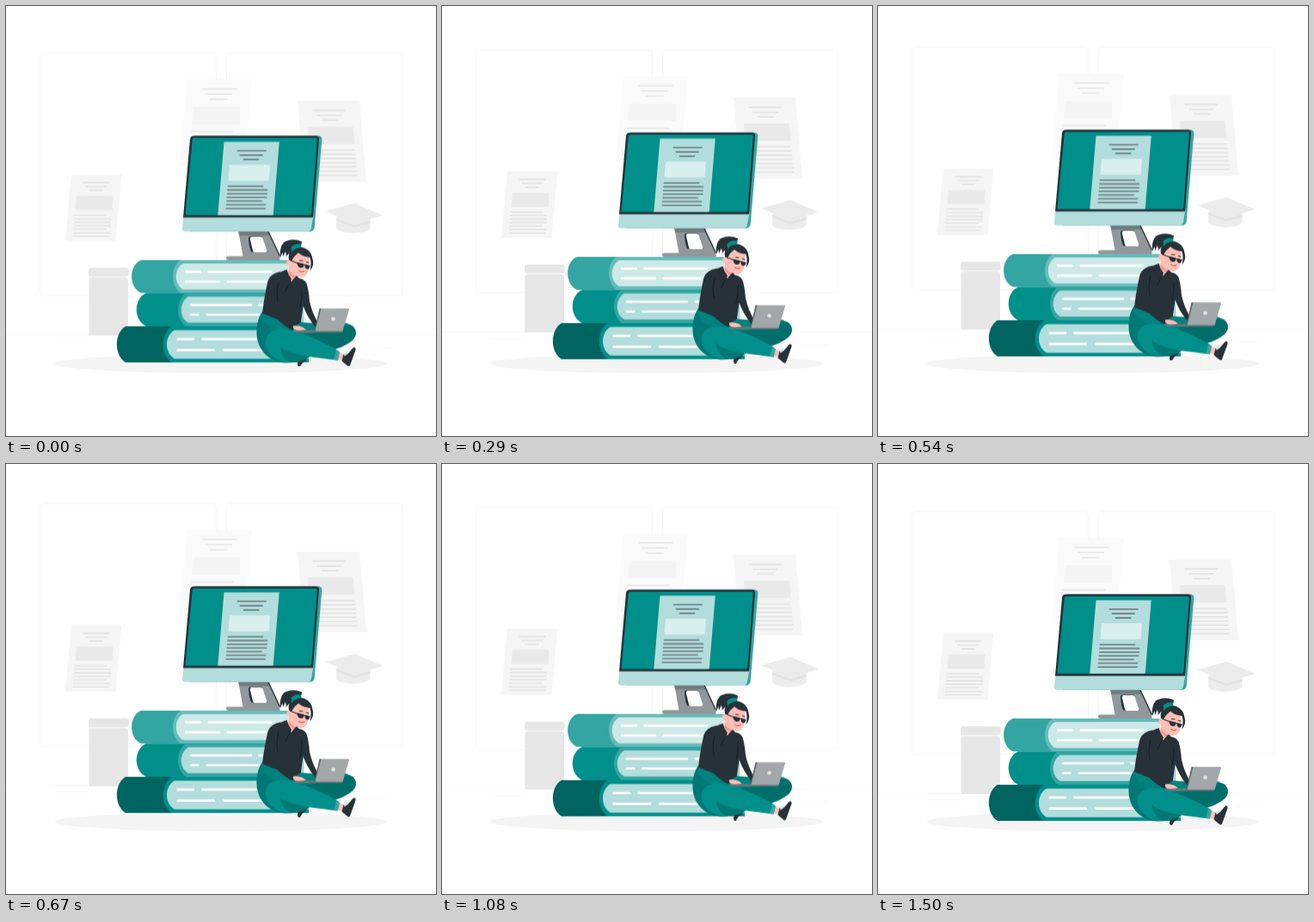
These frames come from a looping animation (500x500 px, 1.54 s). An HTML page:

```html
<!DOCTYPE html>
<html lang="en">
<head>
<meta charset="utf-8">
<title>Reading online</title>
<style>
html, body { margin: 0; width: 100%; height: 100%; overflow: hidden; background: #fff; }
svg { display: block; width: 100vw; height: 100vh; }
.float { animation: float 1540ms linear -45ms infinite; }
@keyframes float { 50% { transform: translateY(-10px); } }
.line { fill: none; stroke-linecap: round; }
.teal { fill: #008f8b; }
.light { fill: #33a5a2; }
.deep { fill: #006461; }
.pale { fill: #b2dddc; }
.ink { fill: #263238; }
.skin { fill: #fdbfb6; }
</style>
</head>
<body>
<svg viewBox="0 0 500 500">
  <ellipse cx="249.5" cy="416" rx="193.5" ry="11" fill="#f4f4f4"/>
  <g class="float">
    <!-- wall and floor -->
    <g fill="none" stroke="#f6f6f6">
      <rect x="39.5" y="55.3" width="205" height="282.2" rx="4"/>
      <rect x="256.5" y="55.3" width="204" height="282.2" rx="4"/>
      <path d="M0 383H500M56 391h40M415 398.5h33" stroke-width=".8"/>
    </g>

    <!-- papers -->
    <path d="M76 196.8H134.5L127.5 274H69Z" fill="#f5f5f5"/>
    <path d="M82 221.5H124.5L123.5 237.8H80.5Z" fill="#e9e9e9"/>
    <path class="line" stroke="#e0e0e0" stroke-width="1.3" d="M90 206h30M93 210.5h24M97 215h15.500M80 243.800h37M79.700 247.900h42M79.400 252h42M79 256.100h42.500M78.700 260.200h38M78.400 264.300h42M78 268.300h41.500"/>
    <path d="M211 86H286L277 186H202Z" fill="#fafafa"/>
    <path d="M218 118H272.500L271.500 138H216Z" fill="#f4f4f4"/>
    <path class="line" stroke="#e4e4e4" stroke-width="1.6" d="M229 97h39M232.500 103h30M237 109h20M216 146.500h48"/>
    <path d="M339 111H411L419 205H347Z" fill="#f5f5f5"/>
    <path d="M351 141H403.500L405.500 161H352Z" fill="#e9e9e9"/>
    <path class="line" stroke="#e0e0e0" stroke-width="1.5" d="M357 122h37M362 127.700h28M367 133.300h18.500M355 168h50M355 172.900h51M356 177.800h50.500M356 182.700h51M357 187.600h50M357 192.500h51M357 197.400h51"/>

    <!-- cap -->
    <path d="M384 246V259C388 266.500 419 266.500 423.500 259V247Z" fill="#ececec"/>
    <path d="M384 247.500L405 255.500L423.500 250V253L405 258L384 250Z" fill="#e2e2e2"/>
    <path d="M371.500 239.500L405 229.800L438.500 244L405 253.800Z" fill="#ebebeb"/>

    <!-- jar -->
    <g fill="#e6e6e6">
      <rect x="96" y="305" width="46.500" height="10.300" rx="3"/>
      <path d="M96.500 383.700V320Q96.500 316.300 100 316.300H138.500Q142 316.300 142 320V383.700Z"/>
    </g>

    <!-- monitor stand -->
    <path d="M270 261H305L318.500 291V296H258.500Q256 296 256 293.700Q256 291.500 258.500 291.500H275.500Z" fill="#91979a"/>
    <path d="M270 261H305L307 267.500H271Z" fill="#737b7f"/>
    <path d="M304.500 262L318.500 291.500" stroke="#263238" stroke-width="1.300"/>
    <path class="ink" d="M284 268.500H297.500L303.500 286.500H285.500Q283 284 282 271Q282 268.500 284 268.500Z"/>
    <path d="M285.500 269H296Q298 269 298.700 271L303.200 284.500Q303.700 287 301.500 287H289.500Q287.500 287 287 285L283.800 271.500Q283.500 269 285.500 269Z" fill="#fff"/>

    <!-- monitor -->
    <path class="light" d="M220 151.500H363Q367.700 151.500 367.300 156L358.700 258Q358 262.800 353 262.800H215Z"/>
    <path class="pale" d="M206.500 245H357.500L355 258.500Q354.200 262.800 350 262.800H208Q204.800 262.800 205 259.500Z"/>
    <path class="ink" d="M218.500 151.500H360.500Q364.300 151.500 364 155.300L357 246.500H206L214 155.500Q214.500 151.500 218.500 151.500Z"/>
    <path class="teal" d="M219 154H360Q362 154 361.800 156L355.300 241.500Q355 243.700 353 243.700H210.500Q208.400 243.700 208.600 241.500L216.700 156Q217 154 219 154Z"/>
    <path class="pale" d="M253.500 158.500H317.800L310.700 243.700H246.300Z"/>
    <path d="M260 185.300H307L305.800 203.700H258.500Z" fill="#d9efee"/>
    <path class="line" stroke="#74868a" stroke-width="1.800" d="M269.500 168.800h32.500M272.500 174h25.500M276.500 179h17M258.500 210.200h40M258 214.500h45.500M257.700 218.800h45.500M257.300 223.100h45.500M257 227.400h40M256.600 231.700h45M256.300 236.200h45"/>

    <!-- books -->
    <path class="light" d="M157 296H328V334.300H157C142.500 328 142.500 302 157 296Z"/>
    <path d="M203 296H328V334.300H203C191 326 191 304 203 296Z" fill="#66bcb9"/>
    <path d="M206 300H328V330.300H206C195 324 195 306 206 300Z" fill="#cce9e8"/>
    <path class="teal" d="M163 334.300H345.500V373H163C148 366 148 341 163 334.300Z"/>
    <path class="light" d="M209 334.300H345.500V373H209C197 364 197 343 209 334.300Z"/>
    <path class="pale" d="M212 338.500H345.500V368.800H212C201 363 201 345 212 338.500Z"/>
    <path class="deep" d="M139 373H352V415H139C125.500 407 125.500 381 139 373Z"/>
    <path class="teal" d="M192.500 373H352V415H192.500C179.500 405 179.500 383 192.500 373Z"/>
    <path class="pale" d="M196 377.500H352V410.800H196C184 404 184 384 196 377.500Z"/>
    <path class="line" stroke="#fff" stroke-width="2.700" d="M209 309.600h17M235.500 309.600h73M209 321.200h39M257.500 321.200h66M215 348.200h70M294.500 348.200h20M215 359.500h8.500M233.500 359.500h70M199.500 387.800h18.500M228.500 387.800h80M199.500 400.600h42.500M253 400.600h50"/>

    <!-- legs -->
    <path class="ink" d="M342 403H351L349 412.500Q344 415 342.300 419.500Q339 421 339 417Z"/>
    <path d="M298 356C292 364 290.500 376 292 387C295 404 309 415 325 415.500C343 415.500 352 411 356 405L330 370Z" fill="#007875"/>
    <path d="M336 377L394 370C404 370 408.500 377 406.500 384C403 394 382 402 352 407Q340 408 330 402Z" fill="#006f6c"/>
    <path d="M298 356C297 363 301 372 312 377L345 383L385 376L398 369.500Q389 368 380 371L340 368L325 362Z" fill="#00827f"/>
    <path class="teal" d="M302 389C304 379 313 376 326 377C345 380 370 392 386.500 401.500L383.500 412.300C366 410 347 408 336 405C326 402 320 398 318.500 396C319 403 323 410 330 415C314 415 300 403 302 389Z"/>
    <path class="light" d="M384 400.800L388.500 403L386 412.800L381 412Z"/>
    <path class="skin" d="M388 403.500L394 406L392 413L386.300 412Z"/>
    <path class="ink" d="M392.500 405.500L397.500 405L404 397.500Q407.500 397 406.300 401L400 418.500Q398.500 420.500 396.500 418.500L390.500 413.500Z"/>
    <path d="M393 404.500L396.500 402.500L397.500 405L393.500 408Z" fill="#d5e6e6"/>

    <!-- torso -->
    <path class="ink" d="M319 309.500L336 317Q346 316 349.500 323Q352 331 353 344Q356 358 364 371L359.500 373.500Q350 362 345.500 349L343 368L336 373L298 358C300 342 302 331 304.500 320Q307 312 319 309.500Z"/>
    <path class="line" stroke="#0f181c" stroke-width=".8" d="M317 322C313 334 316 345 319 353Q325 365 335 372M344 330Q345 340 342 350M331 319L325 332"/>
    <path class="ink" d="M307 340C306 354 314 368 333 377.500L336.500 372Q324 362 318 345Z"/>

    <!-- neck and head -->
    <path class="skin" d="M329 299L328 312Q329 319 332 321Q337 320 337.500 313L343 310V298Z"/>
    <path d="M329 307Q332 314 340 315L337 318Q330 316 328.500 311Z" fill="#f29b92"/>
    <path class="ink" d="M320 309.500L326.500 307Q328 313 332 318L330 323Q323 318 320 309.500ZM338 314L341.500 318L334 323L332.500 320Z"/>
    <path class="ink" d="M337 275Q325 273 321 278Q318 284 319 293L321.500 287L322 292L325 286Q326 290 325.500 292Q330 286 334 286Z"/>
    <path class="ink" d="M322 276Q332 269.500 344 274.500L343 280L331 281Z"/>
    <path class="skin" d="M329 292C332 284 347 283 351.500 292C354 303 352 316 342.500 316C335 315 328 307 329 292Z"/>
    <circle class="skin" cx="329.500" cy="299.500" r="3.400"/>
    <path class="ink" d="M329 296C327 285 334 280 343 281C351 282 356 288 356.500 295C358 300 357 304 353.500 308.500Q355.500 300 353.500 293Q345 292 340 287.500Q335 291 332 297Z"/>
    <path class="teal" d="M331.500 281Q336 276 343 277.500L343.500 281.500Q336 281 332 287Z"/>
    <path class="line" stroke="#263238" stroke-width="1.100" d="M331 296.500L340 300L353 303M341.500 296.500L345 297M349.500 298.300L352 299"/>
    <path class="ink" d="M338.500 298.500L346.500 300.500Q346.500 305.500 342.500 305Q338.500 304 338.500 298.500ZM347.500 301L353.500 302.500Q353 307 350 306.500Q347 305.500 347.500 301Z"/>
    <path class="line" stroke="#a54b4b" stroke-width=".9" d="M340.500 308.500Q343.500 311 347 309"/>

    <!-- laptop -->
    <path d="M345 377.200H391.500V379.500Q391 380.300 389 380.300H335Q333 379 334 377.800Z" fill="#6c7477"/>
    <path d="M364.500 352.300H367L360.500 379H358.500Z" fill="#596266"/>
    <path d="M366.500 352.300H398Q399.300 352.300 399 353.500L391.500 378.500H359.500Z" fill="#a2a7a9"/>
    <circle cx="380.500" cy="364.500" r="2.300" fill="#e3e5e6"/>
    <path class="skin" d="M334 372.500Q340 371.500 345 374L349 377Q342 378 337 377.500Q333 375.500 334 372.500Z"/>
  </g>
</svg>
</body>
</html>
```
